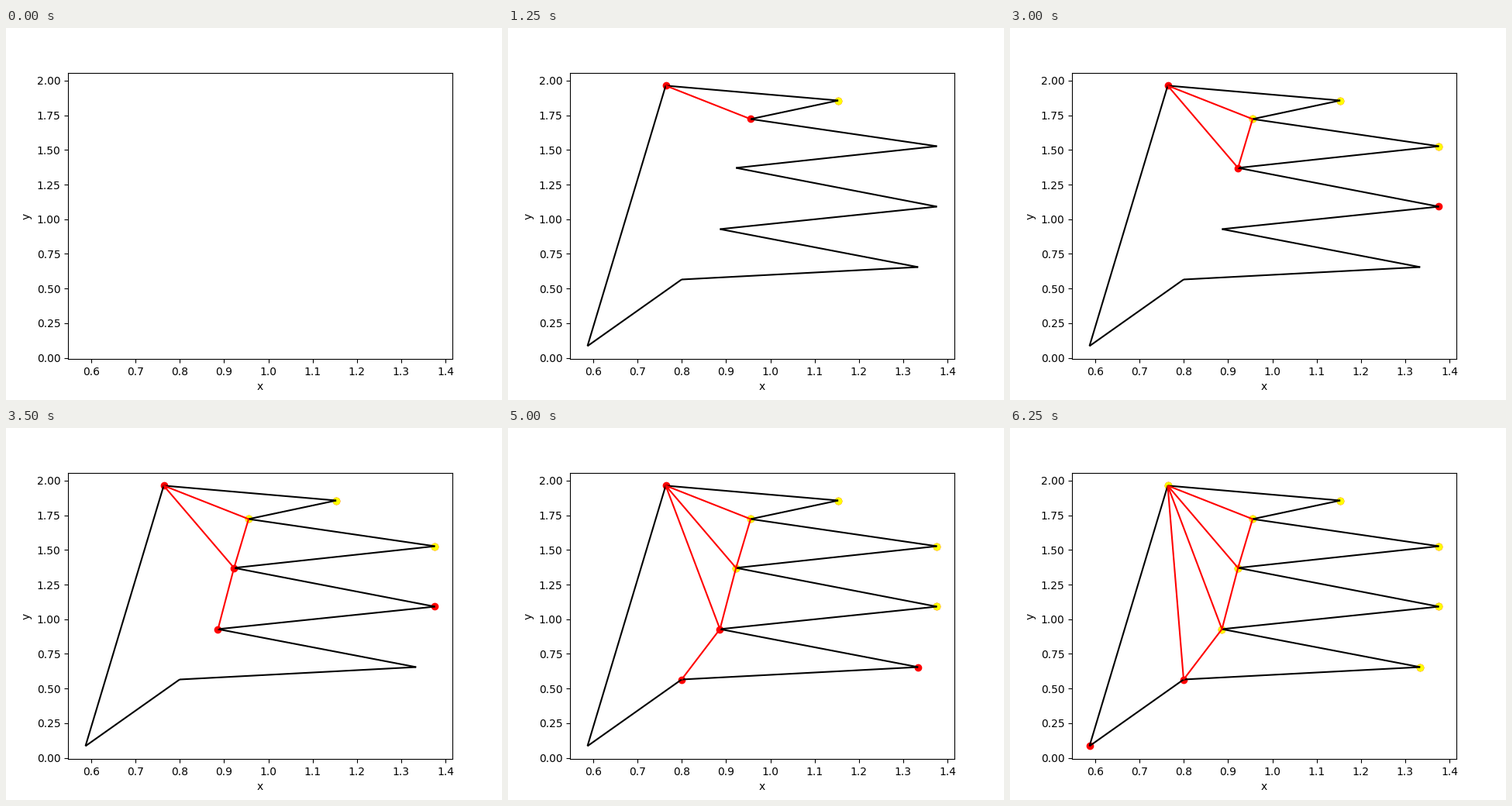
Write a matplotlib script that moves like this. It is 640 px wide and 480 px high and loops after 6500 ms.

```python
import matplotlib.pyplot as plt
from matplotlib.animation import FuncAnimation
from matplotlib.collections import LineCollection

# Vertices of a y-monotone polygon, named in boundary order
POINTS = dict(
    A=(0.7637, 1.9640), B=(1.1533, 1.8570), C=(0.9554, 1.7230),
    D=(1.3762, 1.5270), E=(0.9225, 1.3705), F=(1.3762, 1.0910),
    G=(0.8862, 0.9285), H=(1.3338, 0.6545), I=(0.7996, 0.5650),
    J=(0.5870, 0.0845),
)
NAMES = "ABCDEFGHIJ"

# One triangulation step per tick:
# "+XY" stack vertices, "-X" release a vertex, "XY" draw a diagonal
STEPS = ("+AB +C CA -B +D +E EC -D EA -C +F +G GE -F GA -E "
         "+H +I IG -H IA -G +J -A").split()
FRAMES = len(STEPS) + 2

fig, ax = plt.subplots(figsize=(6.4, 4.8), dpi=100)
ax.set_xlabel("x")
ax.set_ylabel("y")


def fit(lo, hi, margin=0.05):
    pad = margin * (hi - lo)
    return lo - pad, hi + pad


xs, ys = zip(*POINTS.values())
ax.set_xlim(*fit(min(xs), max(xs)))
ax.set_ylim(*fit(min(ys), max(ys)))


def add_lines(pairs, color):
    segments = [(POINTS[a], POINTS[b]) for a, b in pairs]
    return ax.add_collection(LineCollection(segments, colors=color), autolim=False)


def add_dots(names, color):
    return ax.scatter(*zip(*(POINTS[n] for n in names)), color=color)


def add_step(step):
    if step[0] == "+":
        return add_dots(step[1:], "red")
    if step[0] == "-":
        return add_dots(step[1:], "yellow")
    return add_lines([step], "red")


outline = add_lines(zip(NAMES, NAMES[1:] + NAMES[0]), "black")
layers = [outline] + [add_step(s) for s in STEPS]


def update(frame):
    for i, layer in enumerate(layers):
        layer.set_visible(i < frame)
    return layers


def init():
    return update(0)


anim = FuncAnimation(fig, update, frames=FRAMES, init_func=init,
                     interval=250, repeat=True, repeat_delay=0)
plt.show()
```
